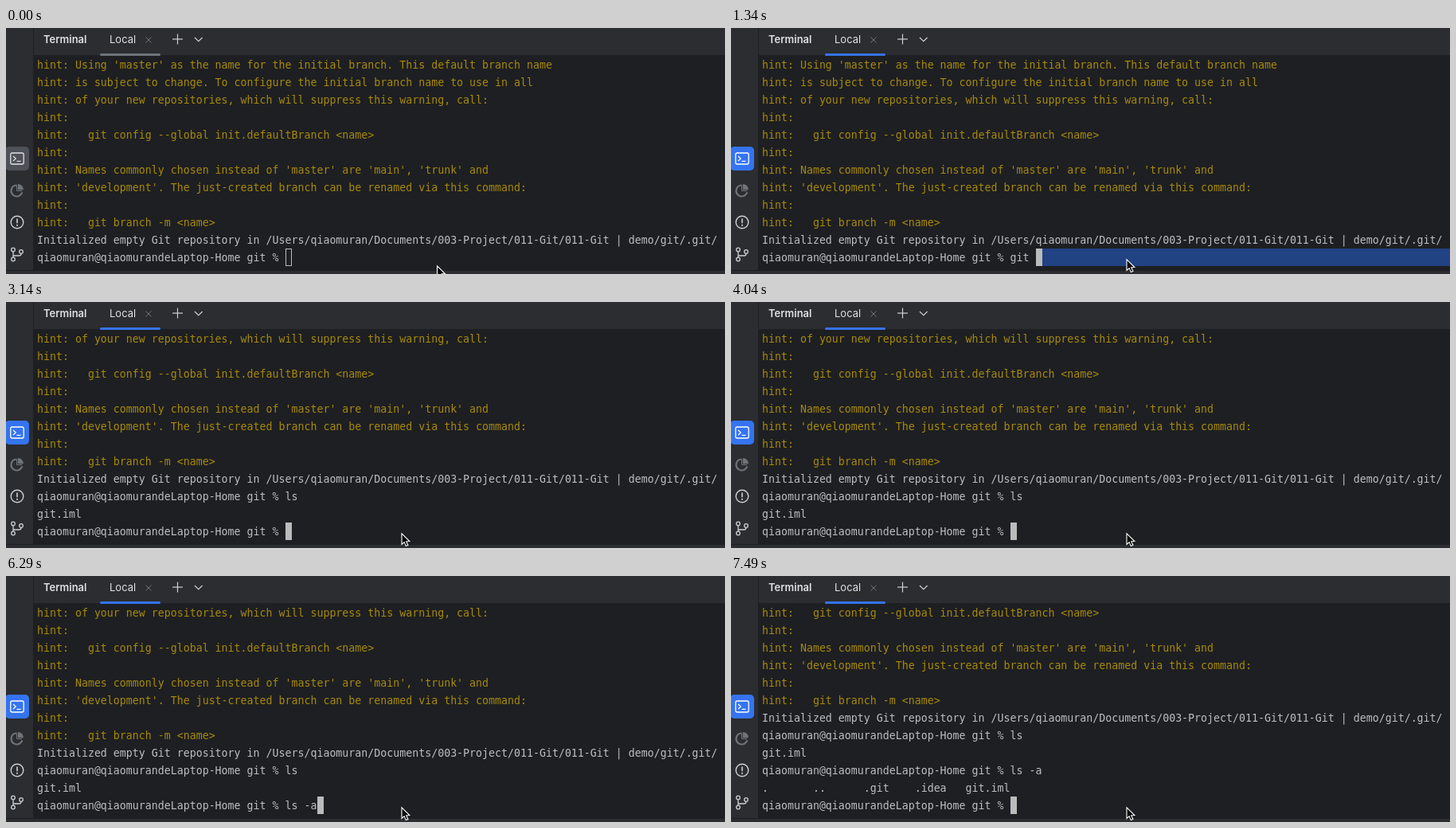
These frames come from a looping animation (903x309 px, 8000 ms). An HTML page with a canvas:

```html
<!DOCTYPE html>
<html lang="en">
<head>
<meta charset="utf-8">
<title>Terminal</title>
<style>
html, body { margin: 0; width: 100%; height: 100%; overflow: hidden; background: #1e1f22; }
canvas { display: block; }
</style>
</head>
<body>
<canvas id="stage" width="903" height="309"></canvas>
<script>
const ctx = document.getElementById('stage').getContext('2d');
const W = 903, H = 309, LOOP = 8000;
const LEFT = 39, TOP = 35, CELL = 8, ROW = 22, ROWS = 12;
const MONO = '13.288px "DejaVu Sans Mono", monospace';
const C = {
  bg: '#1e1f22', panel: '#2b2d30', text: '#bcbec4', hint: '#a68a0d', title: '#dfe1e5',
  icon: '#ced0d6', dim: '#6f737a', idle: '#4e5157', blue: '#3574f0',
  select: '#214283', caret: '#bbbbbb'
};

const PROMPT = 'qiaomuran@qiaomurandeLaptop-Home git % ';
const HINTS = [
  "Using 'master' as the name for the initial branch. This default branch name",
  'is subject to change. To configure the initial branch name to use in all',
  'of your new repositories, which will suppress this warning, call:',
  '',
  '  git config --global init.defaultBranch <name>',
  '',
  "Names commonly chosen instead of 'master' are 'main', 'trunk' and",
  "'development'. The just-created branch can be renamed via this command:",
  '',
  '  git branch -m <name>'
].map(s => 'hint: ' + s);
const LOG = [
  ...HINTS,
  'Initialized empty Git repository in /Users/qiaomuran/Documents/003-Project/011-Git/011-Git | demo/git/.git/',
  PROMPT + 'ls',
  'git.iml',
  PROMPT + 'ls -a',
  '.       ..      .git    .idea   git.iml'
];

// start time, typed text, caret: 1 shown, 0 hidden, 'home' at line start
const TYPING = [
  [0, '', 1], [890, '', 0], [1190, 'gi', 1], [1340, 'git ', 1], [2090, 'gi', 1],
  [2240, 'g', 1], [2390, '', 1], [2690, 'ls', 1], [2990, 'ls', 'home'], [3140, '', 1],
  [3590, '', 0], [4040, '', 1], [4640, '', 0], [4940, 'l', 1], [5090, 'ls', 1],
  [5690, 'ls ', 1], [5990, 'ls -', 1], [6290, 'ls -a', 1], [6440, '', 1],
  [7040, '', 0], [7490, '', 1]
];
const SCROLL = [[0, 0], [3140, 2], [6440, 4]];
const MOUSE = [[0, 541, 298], [150, 509, 295], [300, 496.5, 290]];
const FOCUS = 450, RUN = 3140;

const at = (steps, t) => steps.filter(s => s[0] <= t).pop();

function rect(x, y, w, h, color) {
  ctx.fillStyle = color;
  ctx.fillRect(x, y, w, h);
}

function round(x, y, w, h, r, color) {
  ctx.fillStyle = color;
  ctx.beginPath();
  ctx.roundRect(x, y, w, h, r);
  ctx.fill();
}

function text(s, x, y, color, font) {
  ctx.font = font;
  ctx.fillStyle = color;
  ctx.fillText(s, x, y);
}

function trace(points) {
  ctx.beginPath();
  points.forEach(([x, y], i) => i ? ctx.lineTo(x, y) : ctx.moveTo(x, y));
}

function line(points, color, width = 1.2) {
  trace(points);
  ctx.strokeStyle = color;
  ctx.lineWidth = width;
  ctx.stroke();
}

function ring(x, y, r, color, width, from = 0, to = Math.PI * 2) {
  ctx.beginPath();
  ctx.arc(x, y, r, from, to);
  ctx.strokeStyle = color;
  ctx.lineWidth = width;
  ctx.stroke();
}

function header(focused) {
  rect(35, 0, W - 35, 34, C.panel);
  text('Terminal', 47, 19, C.title, '600 13px Inter, sans-serif');
  text('Local', 130, 19, C.title, '13px Inter, sans-serif');
  line([[175.5, 11.5], [182.5, 18.5]], C.dim, 1);
  line([[182.5, 11.5], [175.5, 18.5]], C.dim, 1);
  line([[209, 14], [222, 14]], C.icon);
  line([[215.5, 7.5], [215.5, 20.5]], C.icon);
  line([[237, 12], [241.8, 16.6], [246.6, 12]], C.icon);
  round(118, 32, 76, 3, 1.5, focused ? C.blue : C.dim);
}

function sidebar(focused) {
  rect(0, 0, 34, 304, C.panel);
  round(-1, 149, 30, 30, 5, focused ? C.blue : C.idle);

  const ink = focused ? '#ffffff' : C.title;
  ctx.strokeStyle = ink;
  ctx.lineWidth = 1.3;
  ctx.beginPath();
  ctx.roundRect(5.8, 157, 16.4, 14, 2);
  ctx.stroke();
  line([[9, 161], [12.3, 164], [9, 167]], ink);
  line([[13.5, 167.4], [18.5, 167.4]], ink);

  const q = Math.PI / 2;
  ring(13.5, 204.5, 7, C.dim, 2.2, 0.25, 3 * q);
  ctx.fillStyle = C.dim;
  ctx.beginPath();
  ctx.moveTo(14.8, 203.2);
  ctx.arc(14.8, 203.2, 7.2, -q, 0);
  ctx.fill();
  line([[13.5, 198], [13.5, 204.5], [20, 204.5]], C.dim, 1);

  ring(14, 244, 7.8, C.icon, 1.4);
  line([[14, 239.5], [14, 245.2]], C.icon, 1.6);
  rect(13.1, 246.9, 1.8, 1.8, C.icon);

  ring(9, 278.5, 2.3, C.icon, 1.3);
  ring(19, 281, 2.3, C.icon, 1.3);
  ring(9, 290.5, 2.3, C.icon, 1.3);
  line([[9, 281], [9, 288]], C.icon, 1.3);
  ctx.beginPath();
  ctx.moveTo(19, 283.4);
  ctx.quadraticCurveTo(19, 286, 16.2, 286);
  ctx.lineTo(9, 286);
  ctx.stroke();
}

function caret(x, y, focused, under) {
  if (focused) {
    rect(x, y, CELL, ROW, C.caret);
    if (under) text(under, x, y + 16, C.bg, MONO);
  } else {
    ctx.strokeStyle = C.caret;
    ctx.lineWidth = 1;
    ctx.strokeRect(x + 0.5, y + 0.5, CELL - 1, ROW - 1);
  }
}

function terminal(t, focused) {
  const [, typed, show] = at(TYPING, t);
  const first = at(SCROLL, t)[1];
  const y = TOP + (ROWS - 1) * ROW;
  const prompt = PROMPT + typed;

  if (focused && t < RUN) rect(383, y, W - 383, ROW, C.select);
  LOG.slice(first, first + ROWS - 1).forEach((s, i) => {
    text(s, LEFT, TOP + i * ROW + 16, s.startsWith('hint:') ? C.hint : C.text, MONO);
  });
  text(prompt, LEFT, y + 16, C.text, MONO);

  if (show === 'home') caret(LEFT, y, focused, prompt[0]);
  else if (show) caret(LEFT + prompt.length * CELL, y, focused);
}

function pointer(x, y) {
  trace([[0.5, 0.8], [0.5, 14.5], [3.6, 11.6], [5.8, 16.6], [8.4, 15.5], [6.2, 10.7], [10.3, 10.5]]
    .map(([a, b]) => [x + a, y + b]));
  ctx.closePath();
  ctx.fillStyle = '#000000';
  ctx.fill();
  ctx.strokeStyle = '#ffffff';
  ctx.lineWidth = 1.1;
  ctx.stroke();
}

function draw(now) {
  const t = now % LOOP;
  const focused = t >= FOCUS;
  rect(0, 0, W, H, C.bg);
  header(focused);
  sidebar(focused);
  rect(0, 305, W, 4, C.panel);
  terminal(t, focused);
  const [, x, y] = at(MOUSE, t);
  pointer(x, y);
}

const start = performance.now();
function tick() {
  draw(performance.now() - start);
  requestAnimationFrame(tick);
}
tick();
</script>
</body>
</html>
```
